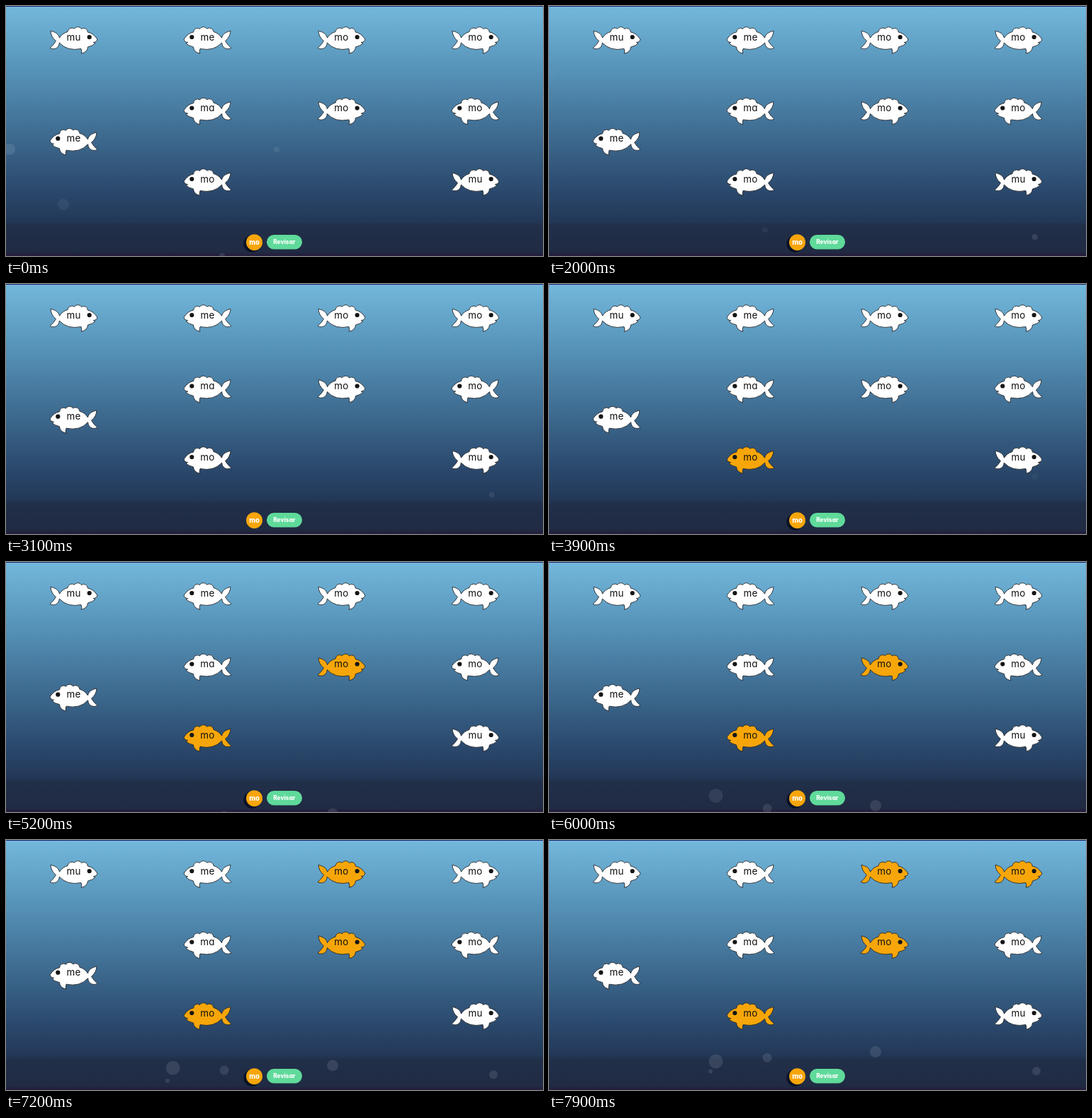
These frames come from a looping animation (758 px wide and 354 px high, 8 s). An HTML page:

```html
<!DOCTYPE html>
<html lang="es">
<head>
<meta charset="utf-8">
<title>Peces y sílabas</title>
<style>
html, body { margin: 0; width: 100%; height: 100%; overflow: hidden; background: #202a42; }
svg { display: block; width: 758px; height: 354px; }
text { font-family: Inter, "Open Sans", sans-serif; text-anchor: middle; font-feature-settings: "cv11"; }
.word { font-size: 13.4px; letter-spacing: .3px; fill: #111; }
.label { fill: #fff; font-weight: 800; }
.fish path { stroke: #25272b; stroke-width: .9; stroke-linejoin: round; }
</style>
</head>
<body>
<svg viewBox="0 0 758 354">
  <defs>
    <linearGradient id="sea" x1="0" y1="0" x2="0" y2="1">
      <stop offset="0" stop-color="#73b8dc"/>
      <stop offset=".28" stop-color="#548fb5"/>
      <stop offset=".56" stop-color="#3a6489"/>
      <stop offset=".73" stop-color="#2b4a6e"/>
      <stop offset=".86" stop-color="#233858"/>
      <stop offset=".88" stop-color="#212f49"/>
      <stop offset="1" stop-color="#202a42"/>
    </linearGradient>
  </defs>
  <rect width="758" height="354" fill="url(#sea)"/>
  <rect width="758" height="1" fill="#20226e"/>
  <rect y="350.5" width="758" height="3.5" fill="#241f3d"/>
  <g id="bubbles"></g>
  <g id="school"></g>
  <circle id="shadow" cx="347.3" cy="336.8" r="12" fill="#0b1226"/>
  <circle cx="350.5" cy="334.7" r="11.5" fill="#f7a60a"/>
  <text class="label" x="350.5" y="337.8" font-size="9.5">mo</text>
  <rect x="368" y="324" width="50" height="20.5" rx="10.25" fill="#5fda9a"/>
  <text class="label" x="392.8" y="337.2" font-size="8.3">Revisar</text>
</svg>
<script>
const LOOP = 8000;
const WHITE = '#fff', ORANGE = '#f7a60a';
const LEFT = 1, RIGHT = -1;

// Left-facing outline around the fish centre: crest, tail, belly with fin, mouth
const OUTLINE = 'M-33.3 -1 Q-28 -9.5 -19.8 -11 A5.5 5.5 0 0 1 -11 -15.5 ' +
  'A6 6 0 0 1 -1 -15.8 A6 6 0 0 1 8.5 -11.5 Q16 -9.5 20 -2.8 ' +
  'C21.5 -9 26 -11 32.5 -12.8 Q32 -4 25 1.5 Q28 7 33.5 11.5 C28 14.5 20.5 12 20.2 4 ' +
  'Q9 16.5 -10.5 12.5 Q-12 16 -10.8 19.3 Q-19.5 17.5 -20 10 ' +
  'Q-27 8.5 -30.5 4.8 L-27.8 3.6 Q-33 3 -33.3 -1 Z';

// word, column, row, side faced, time it turns orange
const FISH = [
  ['mu', 0, 0, RIGHT], ['me', 1, 0, LEFT], ['mo', 2, 0, RIGHT, 6200], ['mo', 3, 0, RIGHT, 7400],
  ['ma', 1, 1, LEFT], ['mo', 2, 1, RIGHT, 5200], ['mo', 3, 1, LEFT],
  ['me', 0, 1.43, LEFT], ['mo', 1, 2, LEFT, 3700], ['mu', 3, 2, RIGHT]
];

// x, radius, time of birth, time of vanishing, starting height
const BUBBLES = [
  [5, 8, -7070, 2300], [81, 8, -5130, 1200], [382, 4, -6980, 1500],
  [305, 4, -1770, 3000], [685.7, 4, -1350, 4600],
  [461, 8, 3360], [308, 6.5, 3700], [228, 3, 4620],
  [235.5, 10, 5570, Infinity, 331.5], [688, 6, 6470, Infinity, 334]
];

function add(parent, tag, attrs) {
  const el = document.createElementNS('http://www.w3.org/2000/svg', tag);
  for (const key in attrs) el.setAttribute(key, attrs[key]);
  return parent.appendChild(el);
}

const clamp = v => Math.max(0, Math.min(1, v));

const school = document.getElementById('school');
const fish = FISH.map(([word, col, row, side, turn]) => {
  const x = 95.5 + 189 * col, y = 48 + 100.5 * row;
  const g = add(school, 'g', { class: 'fish', transform: `translate(${x} ${y})` });
  const body = add(g, 'g', { transform: `scale(${side} 1)` });
  const skin = add(body, 'path', { d: OUTLINE });
  add(body, 'circle', { cx: -22.2, cy: -4, r: 3.1, fill: '#151515' });
  add(g, 'text', { class: 'word', y: .5 }).textContent = word;
  return { skin, turn };
});

const pond = document.getElementById('bubbles');
const bubbles = BUBBLES.map(([x, r, born, end = Infinity, floor = 360 + r]) =>
  ({ el: add(pond, 'circle', { cx: x, r, fill: '#dbe4f2' }), born, end, floor }));

const shadow = document.getElementById('shadow');

function draw() {
  const t = performance.now() % LOOP;
  for (const { skin, turn } of fish) skin.setAttribute('fill', t >= turn ? ORANGE : WHITE);

  // Bubbles speed up as they rise and fade before vanishing
  for (const { el, born, end, floor } of bubbles) {
    const age = (t - born) / 1000;
    el.setAttribute('cy', floor - 3.3 * age * age);
    el.setAttribute('opacity', .12 * clamp(age * 2) * clamp((end - t) / 2000));
  }

  shadow.setAttribute('opacity', t >= 2300 && t < 3700 ? 0 : 1);
  requestAnimationFrame(draw);
}
draw();
</script>
</body>
</html>
```
